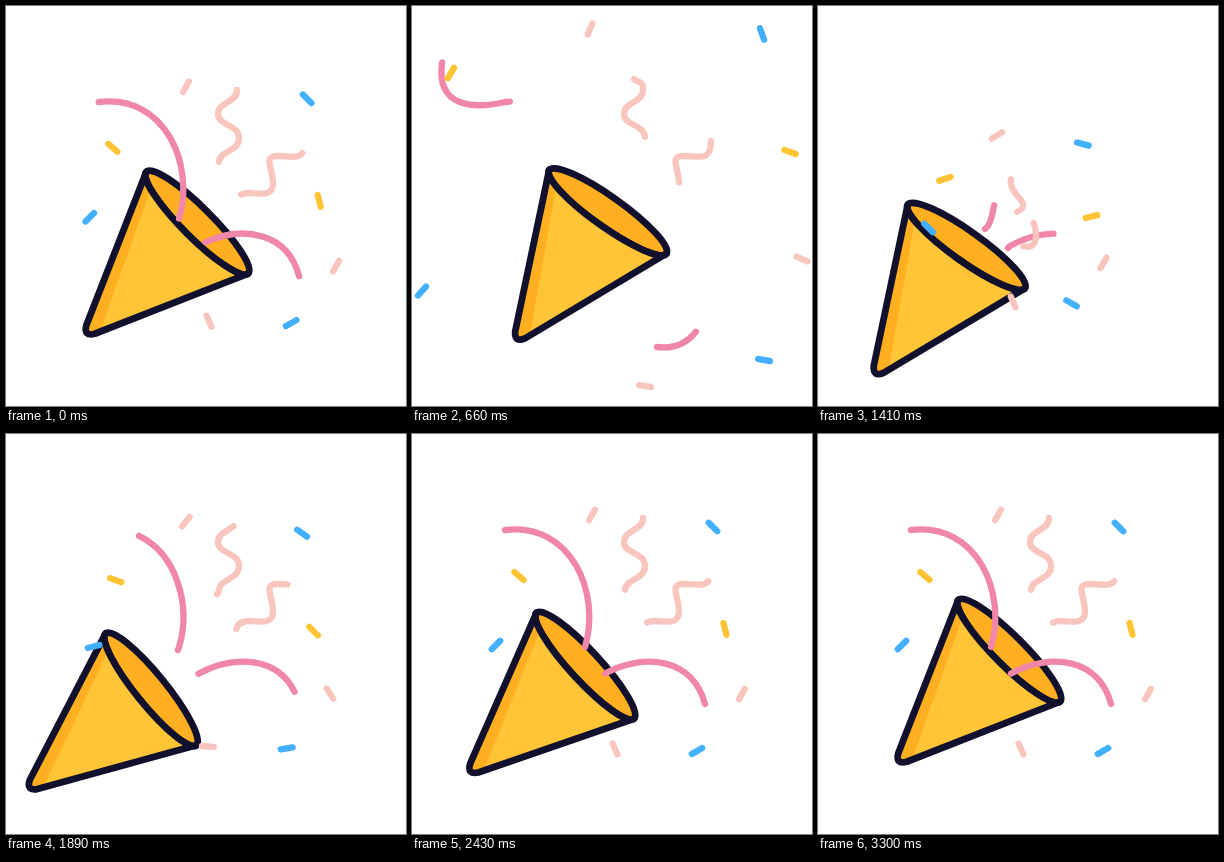
An HTML page that plays this animation: 400 by 400 pixels, repeating every 3330 ms.

```html
<!DOCTYPE html>
<html lang="en">
<head>
<meta charset="utf-8">
<title>Party popper</title>
<style>
  html, body { margin: 0; width: 100%; height: 100%; overflow: hidden; background: #fff; }
  svg { display: block; width: 100vw; height: 100vh; }
  #bits path { fill: none; stroke-width: 6.3; stroke-linecap: round; stroke-linejoin: round; }
  .ink { stroke: #11112e; stroke-width: 6.8; stroke-linejoin: round; }
</style>
</head>
<body>
<svg viewBox="0 0 400 400">
  <g id="cone">
    <ellipse class="ink" cx="76" cy="0" rx="15" ry="72" fill="#ffaf20"/>
    <path d="M76-72L-75-6Q-85 0-75 6L76 72A15 72 0 0 1 76-72Z" fill="#ffc536"/>
    <path d="M76-72L-75-6Q-85 0-75 6L-67 7L65-56Z" fill="#ffaf20"/>
    <path class="ink" d="M76-72L-75-6Q-85 0-75 6L76 72A15 72 0 0 1 76-72Z" fill="none"/>
  </g>
  <g id="bits"></g>
</svg>
<script>
const LOOP = 3330, GONE = 1080, BURST = 1140, SETTLED = 2400;
const PINK = '#f187a8', PALE = '#f9c6bf', BLUE = '#43b0ff', GOLD = '#ffc433';
const MOUTH = [176, 249], PULL = .29;
const cone = document.getElementById('cone');
const bits = document.getElementById('bits');

const ramp = (t, a, b) => Math.max(0, Math.min(1, (t - a) / (b - a)));
const mix = (a, b, p) => a + (b - a) * p;
const out = (p, n = 2) => 1 - (1 - p) ** n;
const smooth = p => p * p * (3 - 2 * p);
// Share of the way still to go after the burst; 1 once the bits are in view
const left = t => (1 - ramp(t, BURST, SETTLED)) / .786;

function addPath(color, d) {
  const el = document.createElementNS('http://www.w3.org/2000/svg', 'path');
  el.setAttribute('stroke', color);
  el.setAttribute('d', d);
  bits.append(el);
  return el;
}

// Length along a path at which it comes closest to a point
function lengthNear(el, [x, y]) {
  let best = 0, least = Infinity;
  for (let s = 0; s < el.getTotalLength(); s += .5) {
    const p = el.getPointAtLength(s), gap = Math.hypot(p.x - x, p.y - y);
    if (gap < least) [best, least] = [s, gap];
  }
  return best;
}

// Ribbons are a window that slides along a path.
// first: head soon after the burst; tail, head: ends at rest
// pace: how fast the head settles; drain: how late the tail runs out
const ribbons = [
  {
    color: PINK, first: [177, 200], tail: [173, 213], head: [93, 96], pace: 2, drain: 1,
    d: 'M167 223Q171 220 173 213C189 160 160 88 93 96C62 103 24 102 30 57L31 51'
  },
  {
    color: PINK, first: [235, 227], tail: [193, 239], head: [293, 270], pace: 2.7, drain: .5,
    d: 'M190 242L192 240C232 218 281 224 293 270C302 305 285 346 245 341L239 340'
  },
  {
    color: PALE, first: [193, 174], tail: [213, 156], head: [231, 85], pace: 4, drain: 2.5,
    d: 'M199 206C217 197 190 190 193 173S211 168 213 156C214 144 233 146 233 132'
      + 'S212 120 212 108S231 96 231 85S228 78 222 73'
  },
  {
    color: PALE, first: [216, 218], tail: [235, 189], head: [297, 149], pace: 3.2, drain: 2.1,
    d: 'M205 240C219 244 220 230 216 218S229 206 230 197S238 187 243 187'
      + 'C252 187 268 192 267 176S257 150 272 150S299 156 299 135'
  }
].map(r => {
  const el = addPath(r.color, r.d);
  const [first, tail, head] = [r.first, r.tail, r.head].map(p => lengthNear(el, p));
  return { ...r, el, first, tail, head, end: el.getTotalLength() };
});

// Colour, pose at rest, pose when flying off (x, y, angle), spin in the burst
const confetti = [
  [PALE, [180, 81, -61], [178, 23, -68], 30],
  [BLUE, [301, 93, 45], [350, 28, 70], -30],
  [GOLD, [107, 142, 41], [39, 67, 121], -60],
  [BLUE, [84, 211, -45], [10, 285, -48], 90],
  [GOLD, [313, 195, 76], [378, 146, 20], -90],
  [PALE, [330, 260, 119], [390, 253, 204], -180],
  [PALE, [203, 315, 246], [233, 380, 189], -180],
  [BLUE, [285, 317, -30], [352, 354, 11], 60]
].map(([color, rest, off, spin]) => ({ el: addPath(color, 'M-6 0H6'), rest, off, spin }));

// Lean in, kick back with the burst, then drift home
function drawCone(t) {
  const lean = out(ramp(t, 0, 660)), home = out(ramp(t, 1890, LOOP));
  const slide = -11.5 * lean + 72 * out(ramp(t, 1110, 1640)) - 60.5 * home;
  const turn = -9.5 * lean + 15.5 * smooth(ramp(t, 1410, 1890)) - 6 * home;
  cone.setAttribute('transform', `translate(${164.4 - .81 * slide} ${243.6 + .59 * slide})`
    + ` rotate(${turn - 45}) translate(-38 0)`);
}

function drawRibbon(r, t) {
  let tail, head;
  if (t < BURST) {
    const p = ramp(t, 0, GONE);
    tail = mix(r.tail, r.end, p ** r.drain);
    head = mix(r.head, r.end, out(p, 3));
  } else {
    const far = left(t) ** r.pace;
    tail = Math.max(0, mix(r.tail, 0, far));
    head = mix(r.head, r.first, far);
  }
  const span = head - tail;
  r.el.setAttribute('visibility', span > .5 ? 'visible' : 'hidden');
  r.el.setAttribute('stroke-dasharray', `${Math.max(.5, span)} 999`);
  r.el.setAttribute('stroke-dashoffset', -tail);
}

function drawBit({ el, rest, off, spin }, t) {
  let [x, y, angle] = rest, scale = 1;
  if (t < BURST) {
    const p = out(ramp(t, 0, GONE), 3) / .941;
    [x, y, angle] = rest.map((v, i) => mix(v, off[i], p));
  } else {
    const pull = PULL * left(t) ** 3;
    x = mix(x, MOUTH[0], pull);
    y = mix(y, MOUTH[1], pull);
    angle += spin * left(t) ** 1.6;
    scale = ramp(t, BURST, BURST + 150);
  }
  el.setAttribute('transform', `translate(${x} ${y}) rotate(${angle}) scale(${scale})`);
  el.setAttribute('opacity', t < BURST ? 1 - ramp(t, 900, 1100) : 1);
}

function draw(t) {
  drawCone(t);
  ribbons.forEach(r => drawRibbon(r, t));
  confetti.forEach(b => drawBit(b, t));
}

const start = performance.now();
function tick(now) {
  draw(Math.max(0, now - start) % LOOP);
  requestAnimationFrame(tick);
}
draw(0);
requestAnimationFrame(tick);
</script>
</body>
</html>
```
